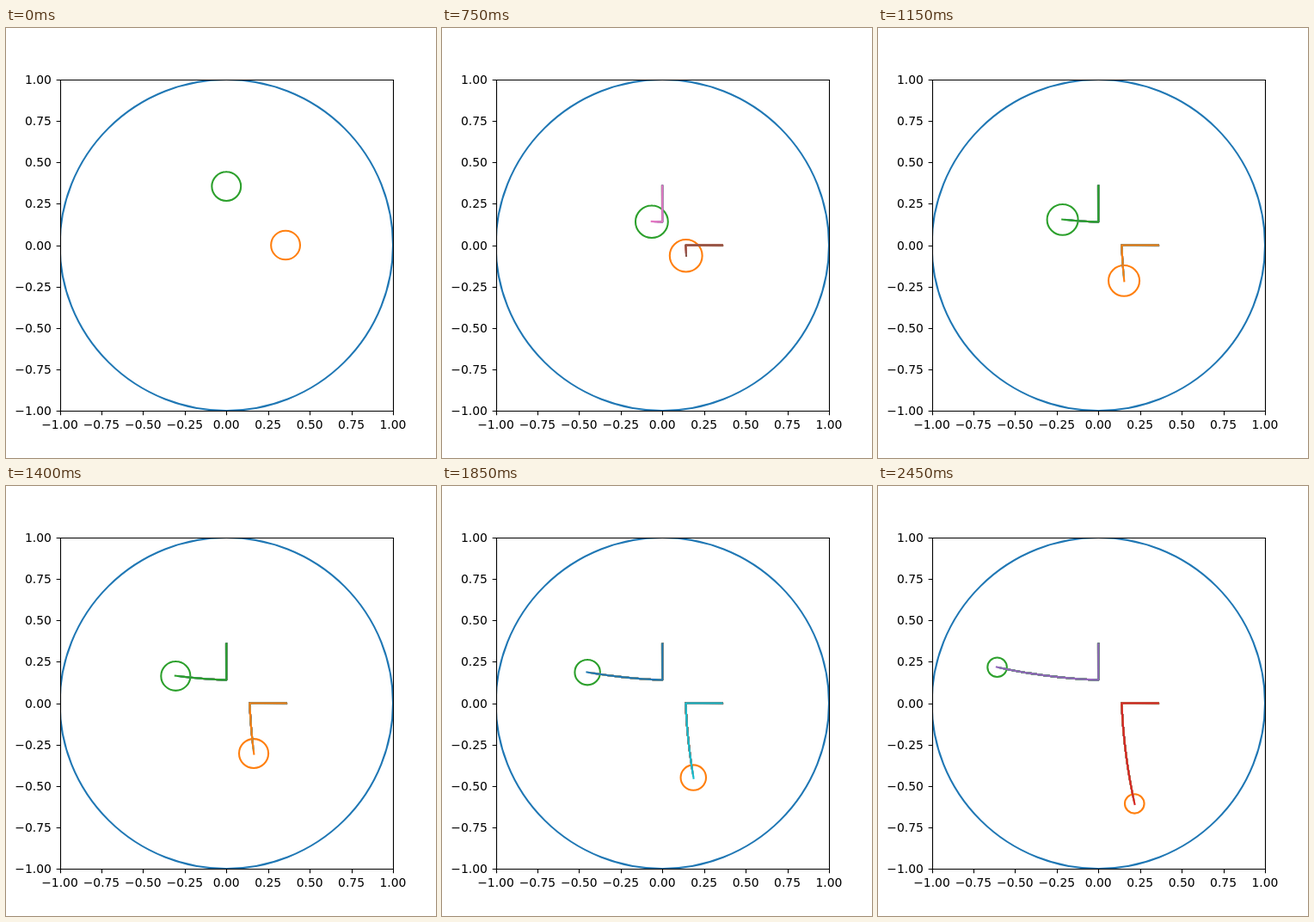
An HTML page with a canvas that plays this animation: 500 px wide and 500 px high, repeating every 2500 ms.

```html
<!DOCTYPE html>
<html>
<head>
<meta charset="utf-8">
<style>
  html, body { margin: 0; width: 100%; height: 100%; overflow: hidden; background: #fff; }
  canvas, svg { position: absolute; left: 0; top: 0; }
  text { font: 13.89px "DejaVu Sans", sans-serif; }
  path { stroke: #000; stroke-width: 1.11; fill: none; }
</style>
</head>
<body>
<canvas id="plot" width="500" height="500"></canvas>
<svg id="axes" width="500" height="500"></svg>
<script>
const FRAME_MS = 50, FRAMES = 50;
const START = 0.375, SPEED = 0.02;   // hyperbolic distances (atanh units)
const DISC = 0.1;                    // disc radius in the Poincaré model
const CONTACT = 0.14;                // distance from the origin at the collision
const HIT = (START - Math.atanh(CONTACT)) / SPEED;
const TILT = 2 * CONTACT ** 2;       // extra deflection caused by curvature
const COLORS = ['#1f77b4', '#ff7f0e', '#2ca02c', '#d62728', '#9467bd',
                '#8c564b', '#e377c2', '#7f7f7f', '#bcbd22', '#17becf'];

const SX = 193.75, SY = 192.5;
const px = x => 256.25 + SX * x;
const py = y => 252.5 - SY * y;
const ctx = document.getElementById('plot').getContext('2d');

// Geodesic motion along the x axis, then away from the contact point.
function position(step) {
  if (step <= HIT) return [Math.tanh(START - SPEED * step), 0];
  const t = Math.tanh(SPEED * (step - HIT));
  const u = t * Math.sin(TILT), v = -t * Math.cos(TILT);
  const re = 1 + CONTACT * u, im = CONTACT * v, norm = re * re + im * im;
  const x = CONTACT + u;
  return [(x * re + v * im) / norm, (v * re - x * im) / norm];
}

// The second particle mirrors the first across the diagonal.
const place = (step, mirrored) => mirrored ? position(step).reverse() : position(step);

function stroke(color) {
  ctx.strokeStyle = color;
  ctx.stroke();
}

function drawDisc(step, mirrored) {
  const [x, y] = place(step, mirrored);
  const p2 = x * x + y * y, s2 = DISC * DISC;
  const shift = (1 - s2) / (1 - p2 * s2);
  const r = DISC * (1 - p2) / (1 - p2 * s2);
  const from = mirrored ? -Math.PI / 2 : 0;
  ctx.beginPath();
  ctx.ellipse(px(x * shift), py(y * shift), r * SX, r * SY, 0, from, from + 2 * Math.PI);
  stroke(COLORS[mirrored ? 2 : 1]);
}

function drawTrail(last, mirrored) {
  const steps = Array.from({ length: last + 1 }, (_, i) => i);
  const straight = last < HIT;
  if (!straight) steps.splice(Math.ceil(HIT), 0, HIT);
  const snap = straight ? Math.round : v => v;
  ctx.beginPath();
  for (const step of steps) {
    const [x, y] = place(step, mirrored);
    ctx.lineTo(snap(px(x)), snap(py(y)));
  }
  stroke(COLORS[(2 * last + 5 + mirrored) % 10]);
}

function draw(now) {
  const frame = Math.floor(now / FRAME_MS) % FRAMES;
  ctx.clearRect(0, 0, 500, 500);
  ctx.beginPath();
  ctx.ellipse(px(0), py(0), SX, SY, 0, 0, 2 * Math.PI);
  stroke(COLORS[0]);
  for (const mirrored of [0, 1]) drawDisc(frame, mirrored);
  // Every step plots the whole trail again in the next colours.
  for (let last = 1; last <= frame; last++)
    for (const mirrored of [0, 1]) drawTrail(last, mirrored);
  requestAnimationFrame(draw);
}

function buildAxes() {
  let path = 'M63.5 60.5H450.5V445.5H63.5Z', labels = '';
  const crisp = v => Math.floor(v + 0.5) + 0.5;
  for (let i = -4; i <= 4; i++) {
    const value = i / 4, x = px(value), y = py(value);
    const label = value.toFixed(2).replace('-', '\u2212');
    path += `M${crisp(x)} 445.5v4.86M63.5 ${crisp(y)}h-4.86`;
    labels += `<text x="${x}" y="466" text-anchor="middle">${label}</text>` +
              `<text x="52.8" y="${Math.round(y + 5)}" text-anchor="end">${label}</text>`;
  }
  document.getElementById('axes').innerHTML = `<path d="${path}"/>${labels}`;
}

ctx.lineWidth = 2.08;
ctx.lineCap = 'square';
ctx.lineJoin = 'round';
ctx.beginPath();
ctx.rect(63, 60, 387, 385);
ctx.clip();
buildAxes();
requestAnimationFrame(draw);
</script>
</body>
</html>
```
